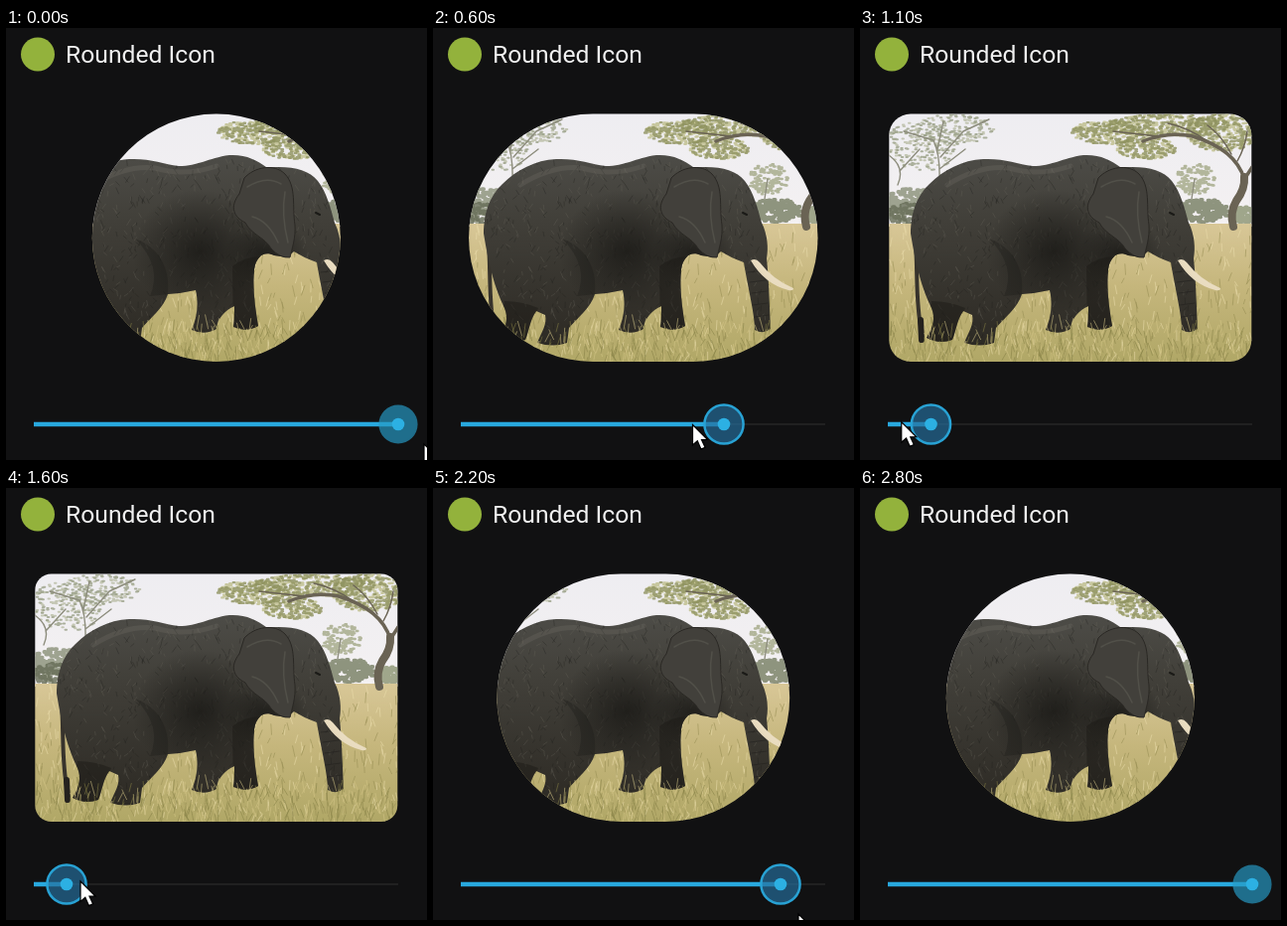
An HTML page for the animation above (3100 ms loop, 424x435 px).

```html
<!DOCTYPE html>
<html lang="en">
<head>
<meta charset="utf-8">
<title>Rounded Icon</title>
<style>
  html, body { margin: 0; width: 100%; height: 100%; overflow: hidden; background: #111112; }
  svg { display: block; width: 424px; height: 435px; }
  text { font: 24.7px Roboto, sans-serif; fill: #f1f1f1; }
  .line { fill: none; stroke-linecap: round; stroke-linejoin: round; }
</style>
</head>
<body>
<svg viewBox="0 0 424 435">
  <defs>
    <clipPath id="clip"><rect id="frame" y="86.5" height="249.5"/></clipPath>
    <linearGradient id="sky" x2="0" y2="1">
      <stop stop-color="#eeedf1"/><stop offset="1" stop-color="#f4f1f2"/>
    </linearGradient>
    <linearGradient id="grass" x2="0" y2="1">
      <stop stop-color="#d8c797"/><stop offset=".45" stop-color="#c5b67c"/><stop offset="1" stop-color="#b0a766"/>
    </linearGradient>
    <linearGradient id="hide" x2="0" y2="1">
      <stop stop-color="#4d4c47"/><stop offset=".35" stop-color="#413f39"/><stop offset="1" stop-color="#2d2a24"/>
    </linearGradient>
    <radialGradient id="shade">
      <stop stop-color="#191815" stop-opacity=".8"/><stop offset="1" stop-color="#191815" stop-opacity="0"/>
    </radialGradient>
    <path id="body" d="M51 207C51 188 56 170 70 157C84 143 103 133 124 132C145 131 158 137 174 139
      C194 139 203 131 225 128C241 127 253 133 262 140L275 140C292 140 306 144 314 154C323 165 327 182 331 196
      C337 208 338 222 336 232C338 250 339 280 340 303Q333 309 324 304C324 288 318 266 313 236
      C304 233 297 229 290 225L283 231L270 229C260 224 252 230 250 243C248 262 251 282 254 300Q242 307 229 301
      C230 294 230 286 230 280C221 284 213 292 212 303Q200 310 187 304C193 290 194 276 191 264
      Q178 267 163 268C159 282 145 292 137 302L135 317Q121 322 105 317C110 305 115 298 113 289L104 285
      C97 295 97 305 93 314Q80 319 67 312C74 300 76 292 72 282C62 262 56 238 51 207Z"/>
    <clipPath id="bodyClip"><use href="#body"/></clipPath>
  </defs>

  <circle cx="32" cy="26.5" r="17" fill="#93b23c"/>
  <text x="60" y="35">Rounded Icon</text>

  <g clip-path="url(#clip)">
    <path d="M29 86H395V200H29Z" fill="url(#sky)"/>
    <g id="trees"></g>
    <path d="M29 197H395V337H29Z" fill="url(#grass)"/>
    <g class="line" stroke="#6a6354">
      <path d="M376 200Q372 186 379 174Q388 162 387 150" stroke-width="8"/>
      <path d="M387 152Q378 122 335 109Q310 104 285 114M386 154L395 140" stroke-width="3.5"/>
      <path d="M374 127Q364 108 350 98M350 114Q330 100 310 96M300 109L255 104M380 134Q388 120 390 104" stroke-width="1.5"/>
      <path d="M80 155Q81 128 74 113L44 104M81 130L104 104L130 92M78 122L84 94M80 142L106 122M38 158Q46 140 29 128M40 144L60 122M334 172L337 152" stroke="#8d8d7d" stroke-width="1.4"/>
    </g>
    <g id="field"></g>
    <path class="line" d="M55 205C59 240 55 275 62 305" stroke="#37332c" stroke-width="4"/>
    <path class="line" d="M61 294L62 314" stroke="#25221e" stroke-width="6"/>
    <use href="#body" fill="url(#hide)"/>
    <g clip-path="url(#bodyClip)">
      <g id="skin"></g>
      <ellipse cx="195" cy="225" rx="68" ry="62" fill="url(#shade)"/>
      <ellipse cx="262" cy="228" rx="42" ry="36" fill="url(#shade)"/>
      <path d="M228 240Q240 230 258 230L262 310H229ZM72 275Q90 275 106 282L90 325H58Z" fill="#1c1a17" opacity=".5"/>
      <path d="M163 268C166 240 152 220 130 212Q158 240 145 270Z" fill="#1c1a18" opacity=".35"/>
      <path class="line" d="M88 158Q120 138 150 141Q180 150 212 139" stroke="#77756c" stroke-width="5" opacity=".25"/>
    </g>
    <path d="M240 151C250 140 270 136 281 147C293 160 288 180 291 198C292 211 288 222 286 231
      Q276 232 267 222C261 211 247 208 241 196C229 190 225 180 235 167Z" fill="#42403b" stroke="#2a2824"/>
    <path class="line" d="M243 160Q262 148 277 157M248 190Q264 194 274 216M281 165Q277 188 284 216" stroke="#5d5a52" stroke-width="1.5" opacity=".6"/>
    <path class="line" d="M312 186L316 188" stroke="#1b1a17" stroke-width="2"/>
    <path class="line" d="M317 246L335 244M319 256L335 254M321 267L336 265M322 279L337 277M324 291L338 289" stroke="#24221f" opacity=".6"/>
    <path d="M320 234Q325 231 329 236Q342 253 363 262Q363 265 358 264Q334 258 320 234Z" fill="#e9dcc0"/>
    <g id="front"></g>
  </g>

  <path d="M28 399H395" stroke="#303031"/>
  <path id="progress" stroke="#28a8de" stroke-width="4.6"/>
  <g id="thumb">
    <circle id="halo" r="19.6"/>
    <circle r="6.3" fill="#2cb0e3"/>
  </g>
  <path id="cursor" d="M0 0V17L4 13.5L7 20.5L10.5 19L7.5 12.5H12.5Z" fill="#fff" stroke="#000"/>
</svg>
<script>
const $ = id => document.getElementById(id);
const set = (id, attrs) => Object.entries(attrs).forEach(([k, v]) => $(id).setAttribute(k, v));

let seed = 11;
const random = () => (seed = seed * 16807 % 2147483647) / 2147483647;
const spread = r => (random() * 2 - 1) * r;

function stroke(parent, color, width, d, opacity) {
  const path = document.createElementNS('http://www.w3.org/2000/svg', 'path');
  Object.entries({ class: 'line', stroke: color, 'stroke-width': width, d, opacity })
    .forEach(([k, v]) => path.setAttribute(k, v));
  $(parent).append(path);
}

function leaves(color, count, cx, cy, rx, ry, size) {
  let d = '';
  while (count--) {
    const angle = random() * 2 * Math.PI, r = Math.sqrt(random());
    d += `M${cx + rx * r * Math.cos(angle)} ${cy + ry * r * Math.sin(angle)}h1.5`;
  }
  stroke('trees', color, size, d, .8);
}

function blades(parent, color, count, top, bottom, size) {
  let d = '';
  while (count--) {
    const y = top + random() * (bottom - top);
    d += `M${29 + random() * 366} ${y}l${spread(size / 3)} ${-size * (.4 + random() * .6)}`;
  }
  stroke(parent, color, 1, d, .55);
}

// Bushes, pale trees and the large acacia canopy
leaves('#8a9078', 150, 50, 178, 24, 18, 4);
leaves('#666c55', 80, 48, 187, 24, 10, 4);
leaves('#767d62', 150, 345, 184, 26, 12, 4);
leaves('#8b9472', 80, 385, 188, 14, 8, 4);
leaves('#a3a886', 130, 337, 152, 20, 16, 2.5);
for (const color of ['#b9bda6', '#9aa088']) {
  leaves(color, 90, 94, 102, 40, 15, 2);
  leaves(color, 110, 62, 118, 36, 26, 2);
}
for (const color of ['#bfbe8b', '#8f9360']) {
  leaves(color, 140, 249, 105, 36, 12, 2.4);
  leaves(color, 190, 310, 98, 62, 11, 2.4);
  leaves(color, 110, 288, 121, 30, 11, 2.4);
  leaves(color, 190, 364, 105, 36, 19, 2.4);
}

blades('field', '#eadcac', 300, 205, 336, 10);
blades('field', '#958d52', 260, 215, 336, 11);
blades('front', '#d3c587', 190, 302, 342, 15);
blades('front', '#858046', 190, 305, 342, 14);
for (const color of ['#6a675c', '#1f1d19']) {
  let d = '';
  for (let i = 0; i < 420; i++) {
    d += `M${50 + random() * 285} ${130 + random() * 180}l${spread(4)} ${2 + random() * 4}`;
  }
  stroke('skin', color, .8, d, .4);
}

// Keys: [ms, x] and [ms, x, y]
const thumbKeys = [[0, 395], [300, 395], [400, 390], [800, 196], [1200, 30], [1400, 28],
  [1600, 61], [2000, 255], [2200, 350], [2400, 395], [3100, 395]];
const cursorKeys = [[0, 421, 419], [300, 381, 402], [400, 362, 403], [800, 161, 396], [1200, 2, 397],
  [1400, 21, 396], [1600, 75, 396], [2000, 277, 420], [2200, 368, 429], [2400, 400, 450], [3100, 400, 450]];

function at(keys, t, axis = 1) {
  const i = keys.findIndex(key => key[0] > t), a = keys[i - 1], b = keys[i];
  return a[axis] + (b[axis] - a[axis]) * (t - a[0]) / (b[0] - a[0]);
}

function draw(now) {
  const t = Math.floor(now % 3100 / 100) * 100;
  const x = at(thumbKeys, t), radius = (x - 28) / 367 * 182.5;
  // Past half the height, the rounding eats into the width instead
  const width = 365 - 2 * Math.max(0, radius - 125);
  const pressed = t >= 300 && t < 2700;

  set('frame', { x: 211.8 - width / 2, width, rx: Math.min(125, radius) });
  set('progress', { d: `M28 399H${x}` });
  set('thumb', { transform: `translate(${x} 399)` });
  set('halo', {
    fill: pressed ? '#256f9c' : '#279bc6',
    'fill-opacity': t === 2700 ? .55 : .68,
    stroke: pressed ? '#28a2d4' : 'none',
    'stroke-width': 2.5
  });
  set('cursor', { transform: `translate(${at(cursorKeys, t)} ${at(cursorKeys, t, 2)}) scale(1.2)` });
  requestAnimationFrame(() => draw(performance.now()));
}
draw(0);
</script>
</body>
</html>
```
